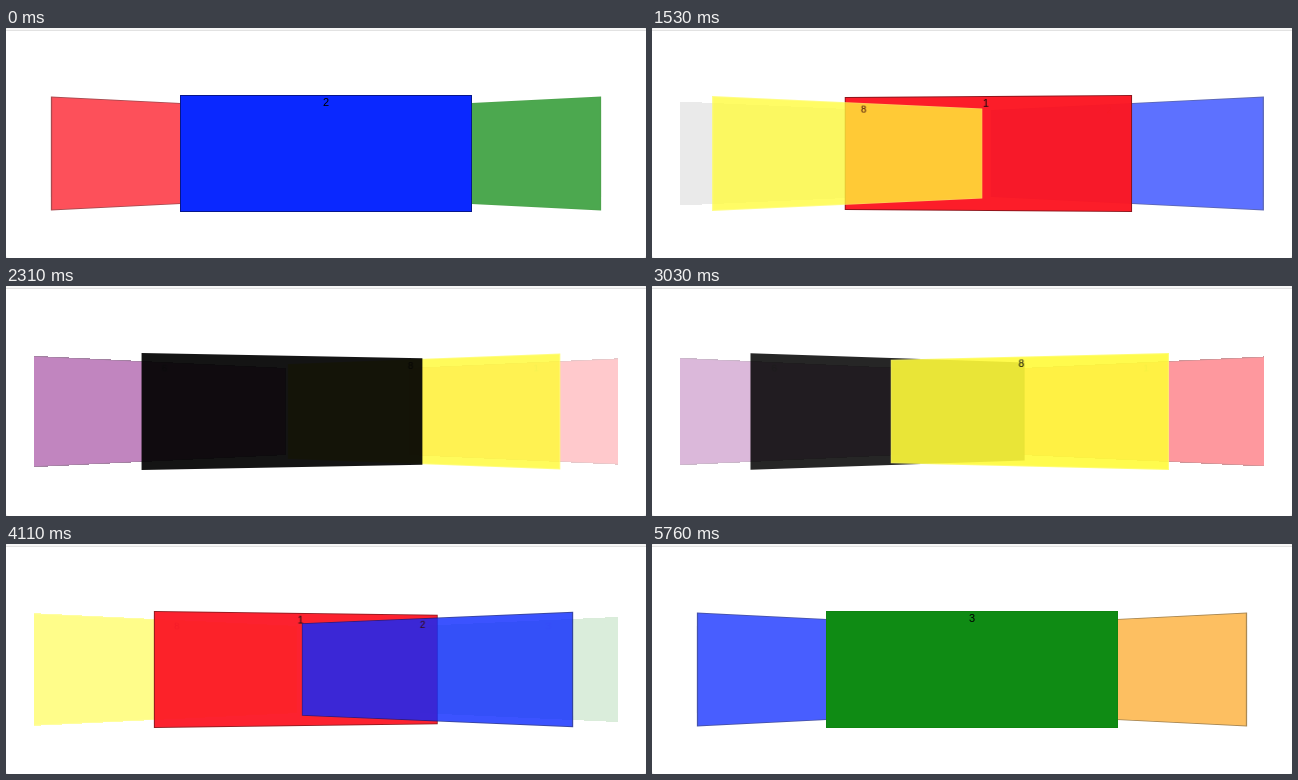
Write an HTML page that moves like this. It is 640x230 px and loops after 5790 ms.

```html
<!DOCTYPE html>
<html lang="en">
<head>
<meta charset="utf-8">
<title>Coverflow carousel</title>
<style>
  html, body { margin: 0; width: 100%; height: 100%; overflow: hidden; background: #e6e6e6; }
  .window { position: absolute; inset: 0; background: #fff; border-radius: 3px; overflow: hidden; }
  .window::before {
    content: ""; display: block; height: 2px;
    background: #f6f6f6; border-bottom: 1px solid #e2e2e2;
  }
  .stage {
    position: absolute; left: 28px; top: 0; width: 584px; height: 230px;
    overflow: hidden; perspective: 315px; perspective-origin: 292px 125.5px;
  }
  .slide {
    position: absolute; left: 146px; top: 67px; width: 292px; height: 117px;
    box-sizing: border-box; border: 1px solid rgba(0, 0, 0, .45);
    font: 11px "Liberation Sans", Arial, sans-serif; text-align: center; color: #000;
  }
</style>
</head>
<body>
<div class="window"><div class="stage"></div></div>
<script>
const LOOP = 5790, DURATION = 480, FIRST = 2;
const COLORS = ['#fc1522', '#0a28ff', '#0f8b14', '#fcaa2c', '#888888', '#861282', '#000000', '#fffb38'];
const BORDERS = { 3: '#0f8410', 8: '#fffd60' };
// Start time and the slide position each move leads to
const MOVES = [[795, 1], [1477, 0], [2116, -1], [2866, 0], [3495, 1], [4033, 2], [4769, 3]];

const stage = document.querySelector('.stage');
const slides = COLORS.map((color, i) => {
  const el = document.createElement('div');
  el.className = 'slide';
  el.textContent = i + 1;
  el.style.backgroundColor = color;
  if (BORDERS[i + 1]) el.style.borderColor = BORDERS[i + 1];
  stage.append(el);
  return el;
});

const bezier = (a, b, s) => 3 * a * s * (1 - s) ** 2 + 3 * b * s * s * (1 - s) + s ** 3;

// CSS "ease"
function ease(x) {
  if (x <= 0 || x >= 1) return x <= 0 ? 0 : 1;
  let lo = 0, hi = 1;
  for (let i = 0; i < 24; i++) {
    const mid = (lo + hi) / 2;
    if (bezier(.25, .25, mid) < x) lo = mid; else hi = mid;
  }
  return bezier(.1, 1, lo);
}

// Signed shortest distance around the ring of slides
function wrap(d) {
  const n = slides.length;
  return d - n * Math.round(d / n);
}

function place(el, offset, isTarget) {
  const side = Math.sign(offset), dist = Math.abs(offset);
  const near = Math.min(dist, 1), far = dist - near;
  const x = near * (119 + 26 * near) + 150 * far;
  const z = -near * (47 + 11 * near);
  el.style.transform = `translate3d(${side * x}px, 0, ${z}px) rotateY(${-side * 20 * near}deg)`;
  el.style.opacity = Math.max(0, 1 - .25 * near - .75 * far);
  el.style.visibility = dist < 2 ? 'visible' : 'hidden';
  el.style.zIndex = isTarget ? 30 : 20 - Math.round(dist * 4);
}

function draw(t) {
  let pos = FIRST, target = FIRST;
  for (const [start, to] of MOVES) {
    if (t < start) break;
    pos = target + (to - target) * ease((t - start) / DURATION);
    target = to;
  }
  slides.forEach((el, i) => place(el, wrap(i + 1 - pos), wrap(i + 1 - target) === 0));
}

const begin = performance.now();
function tick() {
  draw((performance.now() - begin) % LOOP);
  requestAnimationFrame(tick);
}
tick();
</script>
</body>
</html>
```
